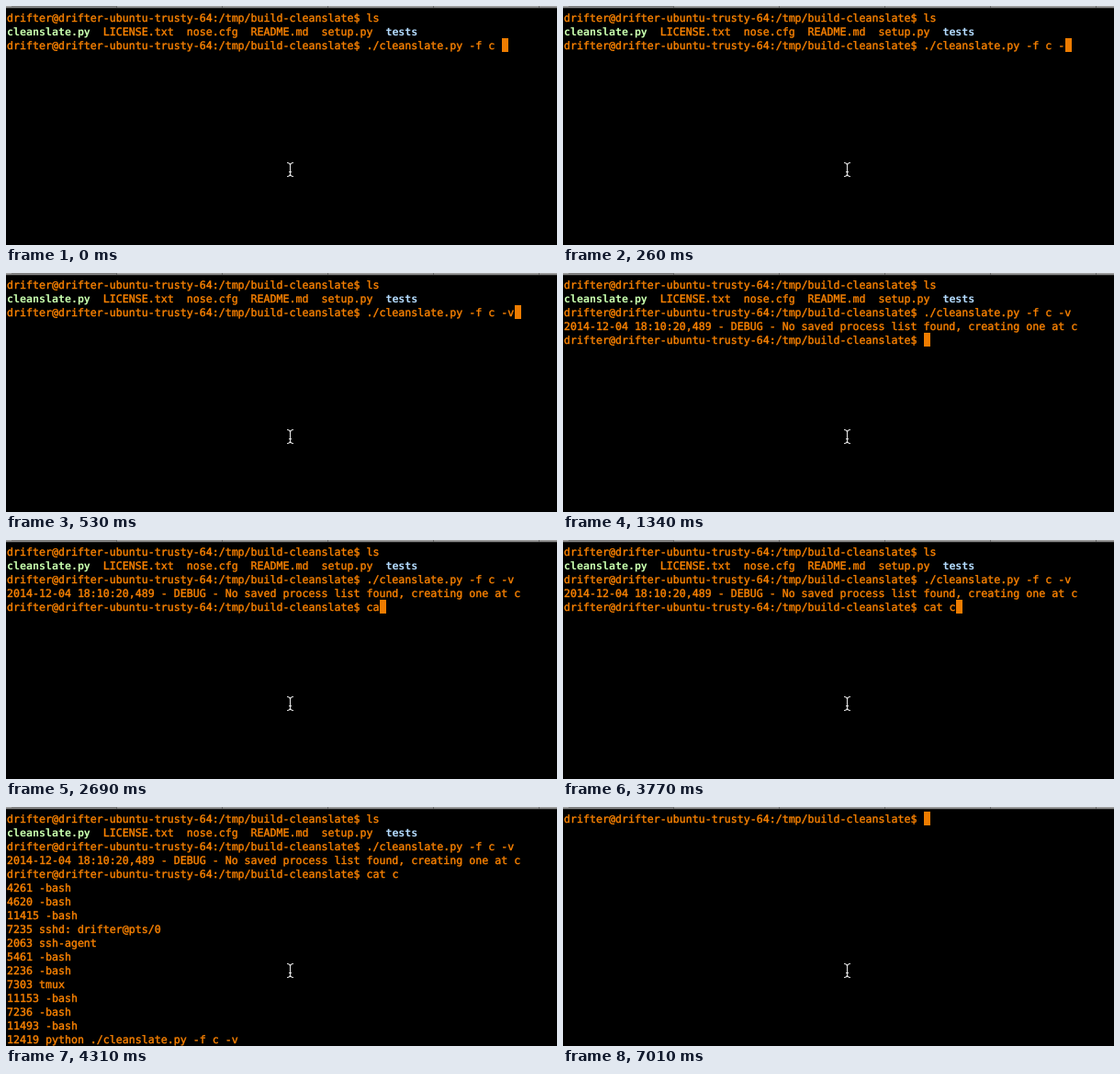
An HTML page that plays this animation: 600x260 px, repeating every 8000 ms.

```html
<!DOCTYPE html>
<html lang="en">
<head>
<meta charset="utf-8">
<title>Terminal session</title>
<style>
  html, body { margin: 0; width: 100%; height: 100%; overflow: hidden; background: #000; }
  .stage { position: relative; width: 600px; height: 260px; overflow: hidden; background: #000; }

  /* Lower edge of the tab bar */
  .tabs {
    position: absolute; left: 0; top: 0; width: 600px; height: 3px;
    background:
      linear-gradient(#777, #777) 6px 0 / 114px 1px no-repeat,
      repeating-linear-gradient(90deg, transparent 0 114px, #666 114px 115px) 6px 0 / 594px 2px no-repeat,
      linear-gradient(#999 0 1px, #8a8a8a 1px 2px, #222 2px);
  }

  /* 7 x 15 px character grid */
  pre, .cursor, .beam { position: absolute; margin: 0; }
  pre {
    left: 1px; top: 6px; color: #fa8200;
    font: 11.627px/15px "DejaVu Sans Mono", monospace;
    text-rendering: geometricPrecision;
    font-variant-ligatures: none;
    -webkit-text-stroke: .4px;
  }
  .exe, .dir { font-weight: bold; -webkit-text-stroke: 0; }
  .exe { color: #c8ffae; }
  .dir { color: #b4dcff; }
  .cursor { left: 1px; top: 5px; width: 7px; height: 15px; background: #ee7c00; animation: cursor 8s step-end infinite; }
  .beam { left: 304px; top: 168px; }

  .step { animation: 8s step-end infinite; }
  .start { animation-name: start; }
  .dash { animation-name: dash; }
  .flag { animation-name: flag; }
  .run { animation-name: run; }
  .ca { animation-name: ca; }
  .t { animation-name: t; }
  .c { animation-name: c; }
  .list { animation-name: list; }

  @keyframes start { 0% { visibility: visible } 87.625%, 100% { visibility: hidden } }
  @keyframes dash { 0%, 87.625%, 100% { visibility: hidden } 3.25% { visibility: visible } }
  @keyframes flag { 0%, 87.625%, 100% { visibility: hidden } 6.625% { visibility: visible } }
  @keyframes run { 0%, 87.625%, 100% { visibility: hidden } 16.75% { visibility: visible } }
  @keyframes ca { 0%, 87.625%, 100% { visibility: hidden } 33.625% { visibility: visible } }
  @keyframes t { 0%, 87.625%, 100% { visibility: hidden } 37% { visibility: visible } }
  @keyframes c { 0%, 87.625%, 100% { visibility: hidden } 47.125% { visibility: visible } }
  @keyframes list { 0%, 87.625%, 100% { visibility: hidden } 53.875% { visibility: visible } }

  @keyframes cursor {
    0% { transform: translate(539px, 30px); visibility: visible }
    3.25% { transform: translate(546px, 30px) }
    6.625% { transform: translate(553px, 30px) }
    16.75% { transform: translate(392px, 60px) }
    33.625% { transform: translate(406px, 60px) }
    37% { transform: translate(420px, 60px) }
    47.125% { transform: translate(427px, 60px); visibility: visible }
    53.875% { transform: translate(427px, 60px); visibility: hidden }
    87.625%, 100% { transform: translate(392px, 0); visibility: visible }
  }
</style>
</head>
<body>
<div class="stage">
  <div class="tabs"></div>
  <div class="cursor"></div>
  <pre>drifter@drifter-ubuntu-trusty-64:/tmp/build-cleanslate$ <span class="step start">ls
<span class="exe">cleanslate.py</span>  LICENSE.txt  nose.cfg  README.md  setup.py  <span class="dir">tests</span>
drifter@drifter-ubuntu-trusty-64:/tmp/build-cleanslate$ ./cleanslate.py -f c </span><span class="step dash">-</span><span class="step flag">v</span>
<span class="step run">2014-12-04 18:10:20,489 - DEBUG - No saved process list found, creating one at c
drifter@drifter-ubuntu-trusty-64:/tmp/build-cleanslate$ </span><span class="step ca">ca</span><span class="step t">t </span><span class="step c">c</span>
<span class="step list">4261 -bash
4620 -bash
11415 -bash
7235 sshd: drifter@pts/0
2063 ssh-agent
5461 -bash
2236 -bash
7303 tmux
11153 -bash
7236 -bash
11493 -bash
12419 python ./cleanslate.py -f c -v</span></pre>
  <svg class="beam" width="12" height="20" fill="none" stroke="#e4e4e4" stroke-width="1.1">
    <path d="M2 2.5Q5 2.5 5.5 4.8V15.2Q5 17.5 2 17.5M9 2.5Q6 2.5 5.5 4.8M9 17.5Q6 17.5 5.5 15.2M4 12.5H7"/>
  </svg>
</div>
</body>
</html>
```
